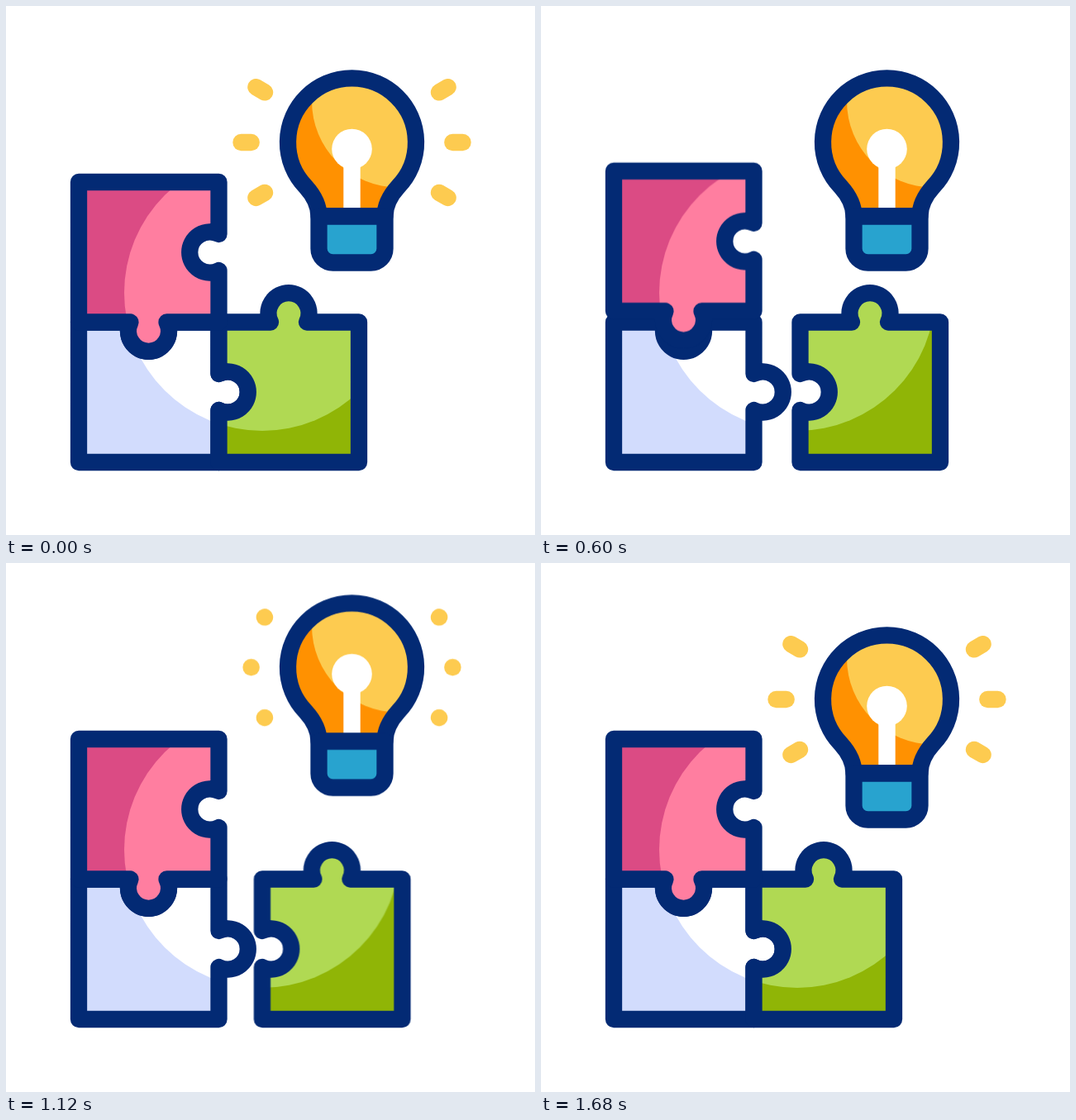
These frames come from a looping animation (640x640 px, 2000 ms). An HTML page without scripts:

```html
<!DOCTYPE html>
<html lang="en">
<head>
<meta charset="utf-8">
<title>Puzzle idea</title>
<style>
  html, body { margin: 0; height: 100%; overflow: hidden; background: #fff; }
  svg { display: block; width: 100vw; height: 100vh; }

  .line { fill: none; stroke: #032a74; stroke-width: 20.3; stroke-linejoin: round; }
  .rays { fill: none; stroke: #fdcb50; stroke-width: 20.4; stroke-linecap: round; }

  .pink, .pale, .green, .bulb, .rays path {
    --dir: 1;
    animation: 2s cubic-bezier(.333, 0, .667, 1) infinite;
  }
  /* The light spot runs its piece's motion backwards, so it stays put on the stage. */
  .spot { --dir: -1; }
  .pink { animation-name: pink; }
  .pale { animation-name: pale; }
  .green { animation-name: green; }
  .bulb { animation-name: bulb; }
  .rays path { stroke-dasharray: 1 2; animation-name: rays; }

  @keyframes pink {
    0%, 2% { transform: translate(0, 0); }
    16.75% { transform: translate(0, calc(var(--dir) * -65.4px)); }
    20.5% {
      transform: translate(0, calc(var(--dir) * -65.4px));
      animation-timing-function: cubic-bezier(.333, 0, .667, .709);
    }
    32.3% {
      transform: translate(0, 0);
      animation-timing-function: cubic-bezier(.333, .607, .667, 1);
    }
    35.35% { transform: translate(0, calc(var(--dir) * 7px)); }
    43.25% { transform: translate(0, 0); }
    65.7% {
      transform: translate(0, 0);
      animation-timing-function: cubic-bezier(.333, .607, .667, 1);
    }
    68.75% { transform: translate(calc(var(--dir) * -7px), 0); }
    76.65%, 100% { transform: translate(0, 0); }
  }
  @keyframes pale {
    0% { transform: translate(0, 0); }
    32.3%, 65.7% {
      transform: translate(0, 0);
      animation-timing-function: cubic-bezier(.333, .607, .667, 1);
    }
    35.35% { transform: translate(0, calc(var(--dir) * 7px)); }
    43.25% { transform: translate(0, 0); }
    68.75% { transform: translate(calc(var(--dir) * -7px), 0); }
    76.65%, 100% { transform: translate(0, 0); }
  }
  @keyframes green {
    0%, 2% { transform: translate(0, 0); }
    16.75% { transform: translate(calc(var(--dir) * 56px), 0); }
    53.9% {
      transform: translate(calc(var(--dir) * 56px), 0);
      animation-timing-function: cubic-bezier(.333, 0, .667, .709);
    }
    65.7% {
      transform: translate(0, 0);
      animation-timing-function: cubic-bezier(.333, .607, .667, 1);
    }
    68.75% { transform: translate(calc(var(--dir) * -7px), 0); }
    76.65%, 100% { transform: translate(0, 0); }
  }
  @keyframes bulb {
    0%, 40.5% { transform: translate(0, 0); }
    58.25%, 61% { transform: translate(0, -40.5px); }
    84%, 100% { transform: translate(0, 0); }
  }
  @keyframes rays {
    0%, 9% { stroke-dashoffset: 0; opacity: 1; }
    19.99% { stroke-dashoffset: -1; opacity: 1; }
    20% { stroke-dashoffset: -1; opacity: 0; }
    54.99% { stroke-dashoffset: 1; opacity: 0; }
    55% { stroke-dashoffset: 1; opacity: 1; }
    71.15%, 100% { stroke-dashoffset: 0; opacity: 1; }
  }
</style>
</head>
<body>
<svg viewBox="0 0 640 640">
  <defs>
    <path id="pinkShape" d="M88 213H257.5V276A24.5 24.5 0 1 0 257.5 320V382.5H194.5A24.5 24.5 0 1 1 150.5 382.5H88Z"/>
    <path id="paleShape" d="M88 382.5H150.5A24.5 24.5 0 1 0 194.5 382.5H257.5V445A24.5 24.5 0 1 1 257.5 489V552H88Z"/>
    <path id="greenShape" d="M257.5 382.5H320A24.5 24.5 0 1 1 364 382.5H427V552H257.5V489A24.5 24.5 0 1 0 257.5 445Z"/>
    <path id="glassShape" d="M378.5 254.5C378.5 241 372.5 229.5 362.5 218.5A77.5 77.5 0 1 1 474.5 218.5C464.5 229.5 458.5 241 458.5 254.5Z"/>
    <clipPath id="pinkClip"><use href="#pinkShape"/></clipPath>
    <clipPath id="paleClip"><use href="#paleShape"/></clipPath>
    <clipPath id="greenClip"><use href="#greenShape"/></clipPath>
    <clipPath id="glassClip"><use href="#glassShape"/></clipPath>
  </defs>

  <g class="pale">
    <g clip-path="url(#paleClip)">
      <use href="#paleShape" fill="#d2dcfd"/>
      <circle class="pale spot" cx="310" cy="347" r="167" fill="#fff"/>
    </g>
    <use href="#paleShape" class="line"/>
  </g>

  <g class="green">
    <g clip-path="url(#greenClip)">
      <use href="#greenShape" fill="#90b506"/>
      <circle class="green spot" cx="310" cy="347" r="167" fill="#b0d953"/>
    </g>
    <use href="#greenShape" class="line"/>
  </g>

  <g class="pink">
    <g clip-path="url(#pinkClip)">
      <use href="#pinkShape" fill="#db4b84"/>
      <circle class="pink spot" cx="310" cy="347" r="167" fill="#ff7ea0"/>
    </g>
    <use href="#pinkShape" class="line"/>
  </g>

  <g class="bulb">
    <g clip-path="url(#glassClip)">
      <use href="#glassShape" fill="#ff9101"/>
      <circle cx="474.5" cy="115" r="104.5" fill="#fdcb50"/>
      <circle cx="418.5" cy="173" r="24.3" fill="#fff"/>
      <path d="M408.3 173h20.4v80h-20.4z" fill="#fff"/>
    </g>
    <use href="#glassShape" class="line"/>
    <path class="line" style="fill:#28a3cf" d="M378.5 254.5H458.5V293.5a17 17 0 0 1-17 17H395.5a17 17 0 0 1-17-17Z"/>
    <g class="rays">
      <path pathLength="1" d="M540.3 165h12.2"/>
      <path pathLength="1" d="M524 104.3l10.6-6.1"/>
      <path pathLength="1" d="M524 225.9l10.6 6.1"/>
      <path pathLength="1" d="M296.7 165h-12.2"/>
      <path pathLength="1" d="M313 104.3l-10.6-6.1"/>
      <path pathLength="1" d="M313 225.9l-10.6 6.1"/>
    </g>
  </g>
</svg>
</body>
</html>
```
